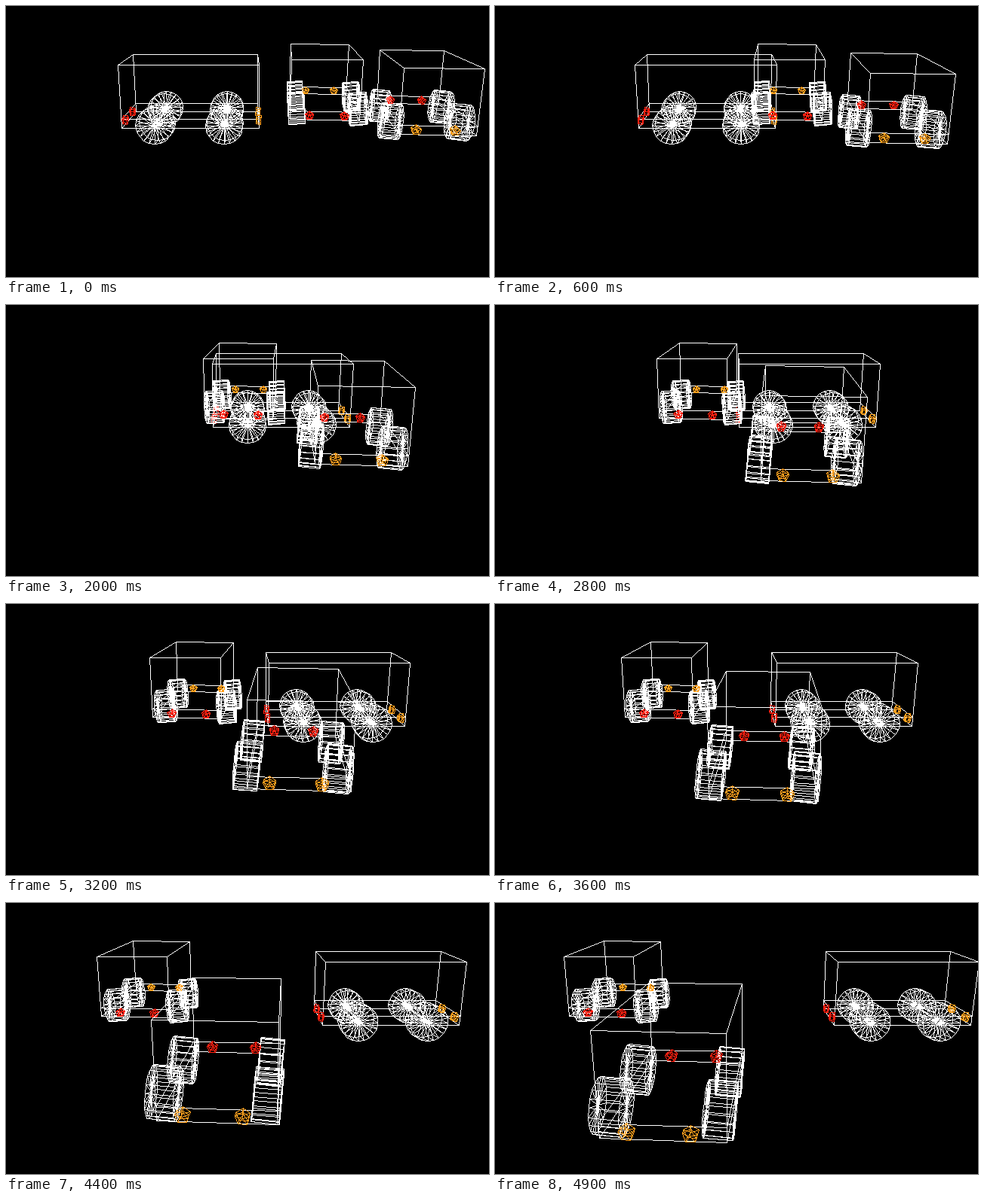
Write an HTML page with a canvas that moves like this. It is 640 by 360 pixels and loops after 5 s.

```html
<!DOCTYPE html>
<html lang="en">
<head>
<meta charset="utf-8">
<title>Wireframe cars</title>
<style>
  html, body { margin: 0; width: 100%; height: 100%; overflow: hidden; background: #000; }
  canvas { display: block; width: 640px; height: 360px; }
</style>
</head>
<body>
<canvas id="stage" width="640" height="360"></canvas>
<script>
const W = 640, H = 360, STEP = 100, STEPS = 50, SPEED = 0.1;
const FOCAL = 720, PITCH = 0.29, EYE = 2.432;
const SIN = Math.sin(PITCH), COS = Math.cos(PITCH);
const WHITE = [255, 255, 255], RED = [255, 32, 16], ORANGE = [255, 160, 30];

// Just short of a right angle: drums and turned cars lean a little.
const QUARTER = 1.5;
const LAY = Math.sin(QUARTER), LEAN = Math.cos(QUARTER);

const ctx = document.getElementById('stage').getContext('2d');
const image = ctx.createImageData(W, H);
const pixels = new Uint32Array(image.data.buffer);

// Packs a colour in the byte order of the pixel buffer.
const pack = ([r, g, b]) => new Uint32Array(new Uint8Array([r, g, b, 255]).buffer)[0];
const BLACK = pack([0, 0, 0]);

// Model points are [forward, right, down] from the middle of the body.
const model = [];
const add = (color, a, b) => model.push([pack(color), a, b]);

function addBody() {
  const corners = [[-1.5, -0.8], [1.5, -0.8], [1.5, 0.8], [-1.5, 0.8]];
  corners.forEach(([f, r], i) => {
    const [nf, nr] = corners[(i + 1) % 4];
    for (const y of [-0.7, 0.5, 0.7]) add(WHITE, [f, r, y], [nf, nr, y]);
    add(WHITE, [f, r, -0.7], [f, r, 0.7]);
  });
}

// A drum with spokes on both faces; sideways drums are wheels.
function addDrum(color, [f, r, y], radius, depth, sides, sideways) {
  const place = (along, across, up) => sideways
    ? [f + across, r + along * LAY - up * LEAN, y - along * LEAN - up * LAY]
    : [f + along * LAY + up * LEAN, r + across, y + along * LEAN - up * LAY];
  const rim = (along, i) => {
    const angle = i * 2 * Math.PI / sides;
    return place(along, radius * Math.sin(angle), radius * Math.cos(angle));
  };
  for (let i = 0; i < sides; i++) {
    for (const along of [-depth / 2, depth / 2]) {
      add(color, rim(along, i), rim(along, i + 1));
      add(color, place(along, 0, 0), rim(along, i));
    }
    add(color, rim(-depth / 2, i), rim(depth / 2, i));
  }
}

addBody();
for (const f of [-0.75, 0.75])
  for (const r of [-0.65, 0.85]) addDrum(WHITE, [f, r, 0.6], 0.4, 0.4, 20, true);
for (const [f, color] of [[-1.5, RED], [1.5, ORANGE]])
  for (const r of [-0.35, 0.45]) addDrum(color, [f, r, 0.6], 0.1, 0.1, 5, false);

const cars = [
  { x: -1.25, z: 12.31, turn: 0, dx: 1, dz: 0 },
  { x: 1.9, z: 13.75, turn: QUARTER, dx: -1, dz: 0 },
  { x: 4.095, z: 12.465, turn: QUARTER + Math.PI, dx: -1, dz: -1 }
];

function project(car, step, [f, r, y]) {
  const c = Math.cos(car.turn), s = Math.sin(car.turn);
  const x = car.x + car.dx * SPEED * step + f * c + r * s;
  const z = car.z + car.dz * SPEED * step + f * s - r * c;
  const drop = EYE + y;
  const depth = z * COS + drop * SIN;
  return [
    Math.floor(W / 2 + FOCAL * x / depth),
    Math.floor(H / 2 + FOCAL * (drop * COS - z * SIN) / depth)
  ];
}

function drawLine(color, [x0, y0], [x1, y1]) {
  const n = Math.max(Math.abs(x1 - x0), Math.abs(y1 - y0), 1);
  for (let i = 0; i <= n; i++) {
    const x = Math.round(x0 + (x1 - x0) * i / n);
    const y = Math.round(y0 + (y1 - y0) * i / n);
    if (x >= 0 && x < W && y >= 0 && y < H) pixels[y * W + x] = color;
  }
}

function draw(step) {
  pixels.fill(BLACK);
  for (const car of cars)
    for (const [color, a, b] of model)
      drawLine(color, project(car, step, a), project(car, step, b));
  ctx.putImageData(image, 0, 0);
}

const start = performance.now();
let shown = -1;
function tick() {
  const step = Math.floor((performance.now() - start) / STEP) % STEPS;
  if (step !== shown) draw(shown = step);
  requestAnimationFrame(tick);
}
tick();
</script>
</body>
</html>
```
